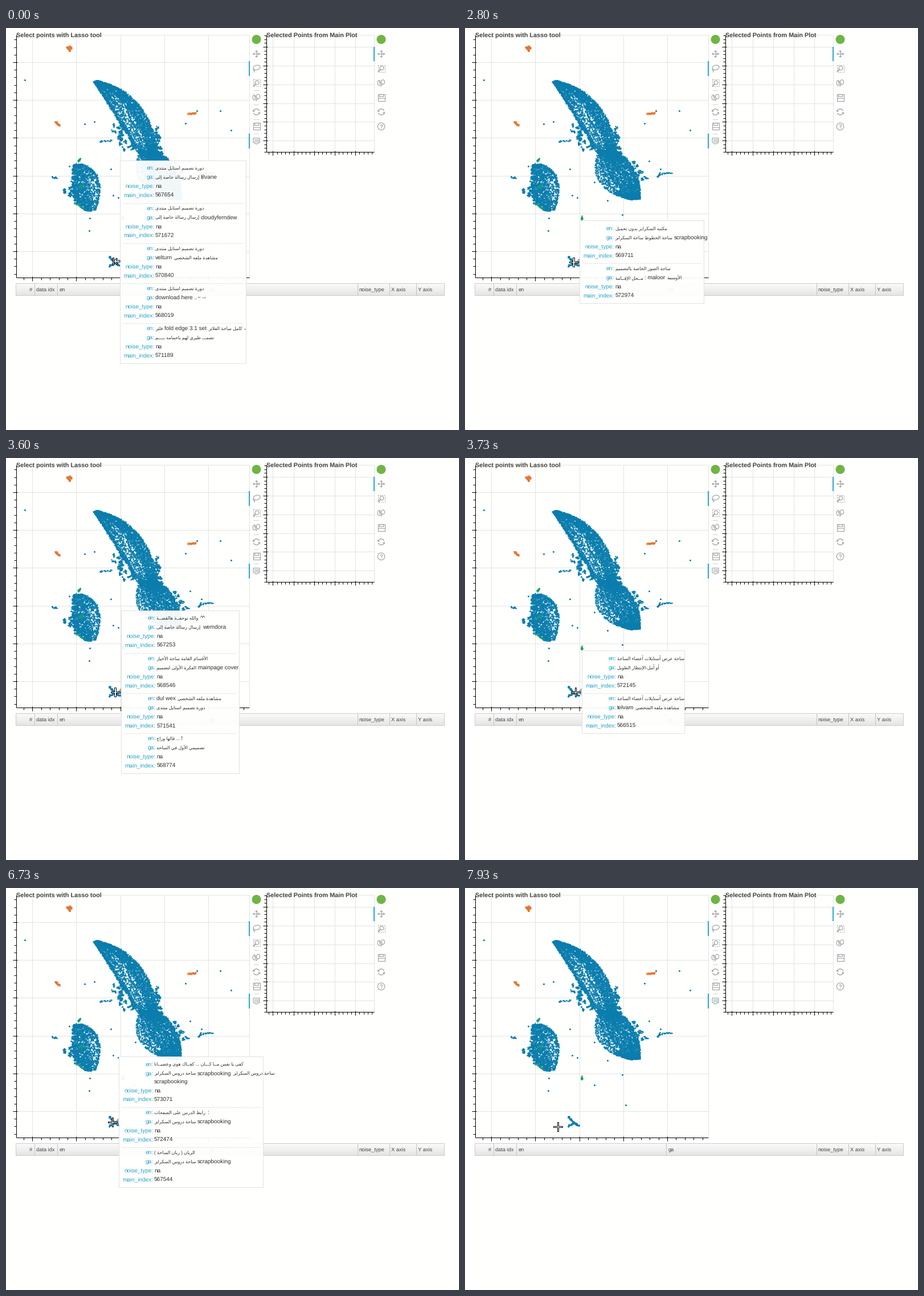
A matplotlib script for the animation above (8 s loop, 795 px wide and 704 px high).

```python
from itertools import groupby

import numpy as np
import matplotlib.pyplot as plt
from matplotlib.animation import FuncAnimation
from matplotlib.patches import Arc, Circle, Ellipse, Polygon, Rectangle

W, H, DPI = 795, 704, 64
STEP, LOOP = 40, 8000
PAGE, BLUE, ORANGE, GREEN, RED = "#fffffd", "#0a7dad", "#e6762e", "#169d6c", "#c8373a"
ICON, ACTIVE, INK = "#a1a6a9", "#26aad1", "#444444"

plt.rcParams["font.family"] = ["Liberation Sans", "DejaVu Sans"]
plt.rcParams["text.hinting"] = "no_hinting"
rng = np.random.default_rng(7)
fig = plt.figure(figsize=(W / DPI, H / DPI), dpi=DPI, facecolor=PAGE)
ax = fig.add_axes([0, 0, 1, 1])
ax.set(xlim=(0, W), ylim=(H, 0))
ax.axis("off")


def pt(px):
    return px * 72 / DPI


def line(points, color=ICON, lw=1.0, **kw):
    xs, ys = zip(*points)
    return ax.plot(xs, ys, color=color, lw=pt(lw), **kw)[0]


def label(x, y, text, size, color=INK, **kw):
    """Text whose capitals are centred near y."""
    return ax.text(x, y + size * 0.36, text, fontsize=pt(size), color=color, **kw)


# ---- Arabic shaping -------------------------------------------------------
LETTERS = "ءآأؤإئابةتثجحخدذرزسشصضطظعغفقكلمنهوىي\ufef5\ufef7\ufef9\ufefb"
TWO_FORMS = "آأؤإاةدذرزوى\ufef5\ufef7\ufef9\ufefb"
FORMS, DUAL, code = {}, {"ـ"}, 0xFE80
for ch in LETTERS:
    FORMS[ch] = code
    count = 1 if ch == "ء" else 2 if ch in TWO_FORMS else 4
    code += count
    if count == 4:
        DUAL.add(ch)
JOINS = set(FORMS) - {"ء"} | {"ـ"}
MIRROR = str.maketrans("()", ")(")


def shape(word):
    for i, alef in enumerate("آأإا"):
        word = word.replace("ل" + alef, chr(0xFEF5 + 2 * i))
    out = ""
    for prev, cur, nxt in zip(" " + word, word, word[1:] + " "):
        if cur in FORMS:
            back = prev in DUAL and cur in JOINS
            ahead = cur in DUAL and nxt in JOINS
            cur = chr(FORMS[cur] + back + 2 * ahead)
        out += cur
    return out[::-1].translate(MIRROR)


def is_rtl(word):
    return word in ("+", "...", "(", ")") or any("\u0600" <= c <= "\u06ff" for c in word)


def mixed_text(x, y, text, size, **kw):
    """Left-to-right runs; Arabic ones are reversed and set smaller."""
    parts = []
    for rtl, words in groupby(text.split(), is_rtl):
        words = list(words)
        run = " ".join(shape(w) for w in reversed(words)) if rtl else " ".join(words)
        run_size = size * 0.8 if rtl else size
        if parts:
            parts.append(ax.annotate(run, (1, y + size * 0.36), xycoords=(parts[-1], "data"),
                                     xytext=(pt(size * 0.28), 0),
                                     textcoords="offset points", fontsize=pt(run_size), **kw))
        else:
            parts.append(ax.text(x, y + size * 0.36, run, fontsize=pt(run_size), **kw))
    return parts


# ---- plot areas -----------------------------------------------------------
def plot_area(x0, y0, x1, y1, gx, dx, gy, dy):
    xs, ys = np.arange(gx, x1, dx), np.arange(gy, y1, dy)
    grid = dict(color="#e3e4e2", lw=pt(1), zorder=1)
    axis = dict(color="black", lw=pt(1), zorder=3)
    ax.vlines(np.append(xs, x1), y0, y1, **grid)
    ax.hlines(np.append(ys, y0), x0, x1, **grid)
    ax.vlines(x0, y0, y1, **axis)
    ax.hlines(y1, x0, x1, **axis)
    ax.vlines(xs, y1 - 2, y1 + 6, **axis)
    ax.hlines(ys, x0 - 6, x0 + 2, **axis)
    small_x = np.arange(gx - dx, x1, dx / 5)
    small_y = np.arange(gy - dy, y1, dy / 5)
    ax.vlines(small_x[small_x > x0], y1, y1 + 4, **axis)
    ax.hlines(small_y[small_y > y0], x0 - 4, x0, **axis)


plot_area(18, 12, 427, 437, 46.2, 77.2, 60, 66.2)
plot_area(457, 12, 646, 217, 468.3, 36.2, 33, 32.85)
label(18, 13, "Select points with Lasso tool", 10.9, weight="bold")
label(457, 13, "Selected Points from Main Plot", 10.9, weight="bold")


# ---- scattered points -----------------------------------------------------
def dots(points, color=BLUE, size=2.5):
    ax.plot(points[0], points[1], "o", ms=pt(size), mew=0, color=color, zorder=2)


def bezier(ends, t):
    a, b, c = (np.array(p)[:, None] for p in ends)
    return a * (1 - t) ** 2 + 2 * b * t * (1 - t) + c * t ** 2


def body(left, right, n, weight):
    """Points between two curves; weight(t, s) is the chance to keep each."""
    t, s = rng.random((2, n))
    p = bezier(left, t) * (1 - s) + bezier(right, t) * s + rng.normal(0, 0.4, (2, n))
    dots(p[:, rng.random(n) < weight(t, s)])


def strand(start, end, n, color=BLUE, spread=0.7):
    a, b = np.array(start)[:, None], np.array(end)[:, None]
    dots(a + (b - a) * rng.random(n) + rng.normal(0, spread, (2, n)), color)


def fringe(edge, t0, t1, near, far, clumps):
    """Short random strands beside an edge."""
    for x, y in bezier(edge, rng.uniform(t0, t1, clumps)).T:
        x += rng.uniform(near, far)
        dx, dy = rng.normal(0, 3.5, 2)
        strand((x, y), (x + dx, y + dy), 12, spread=1.1)


def streaks(t, s):
    thin = 0.15 + 0.6 * np.sin(s * 30 + 2 * t) ** 2
    return np.where((s > 0.55) | (s < 0.1), 1, thin)


WING_L, WING_R = [(154, 94), (187, 146), (236, 226)], [(160, 92), (257, 114), (268, 228)]
LOBE_L, LOBE_R = [(234, 212), (209, 284), (292, 300)], [(264, 214), (310, 240), (307, 299)]
ISLE_L, ISLE_R = [(117, 239), (109, 297), (138, 319)], [(134, 238), (182, 256), (156, 320)]

body(WING_L, WING_R, 4600, streaks)
body(LOBE_L, LOBE_R, 3300,
     lambda t, s: np.where((s > 0.32) | (t > 0.75), 1, 0.3 + 0.5 * np.cos(s * 16) ** 2))
body(ISLE_L, ISLE_R, 2100,
     lambda t, s: np.where(s < 0.6, 0.9, np.where(s > 0.9, 0.9, 0.45)))
fringe(WING_L, 0.62, 0.93, -22, 2, 22)
fringe(WING_R, 0.72, 0.98, 0, 6, 14)
fringe(LOBE_R, 0.35, 0.7, 2, 10, 7)
fringe(ISLE_L, 0.35, 0.8, -20, 0, 15)
dots(rng.uniform([[30], [80]], [[410], [380]], (2, 24)), size=3)

HUB = (191, 411)
for tip in ((181, 400), (200, 416), (181, 417)):
    strand(HUB, tip, 28)
for start, end in (((163, 199), (187, 196)), ((344, 255), (362, 253)),
                   ((338, 260), (342, 254)), ((80, 260), (88, 263))):
    strand(start, end, 16)
for start, end in (((106, 33), (115, 34)), ((108, 35), (113, 40)),
                   ((320, 149), (333, 149)), ((87, 165), (95, 171))):
    strand(start, end, 26, ORANGE, 0.9)
for start, end in (((126, 233), (131, 228)), ((118, 306), (139, 318)),
                   ((128, 278), (134, 277)), ((204, 330), (205, 335))):
    strand(start, end, 14, GREEN)
dots(np.array([(125, 289), (146, 307)]).T, RED, 1.8)


# ---- toolbars -------------------------------------------------------------
def outline_icon(patch):
    patch.set(fill=False, ec=ICON, lw=pt(1.2))
    ax.add_patch(patch)


def logo(x, y):
    ax.add_patch(Circle((x, y), 8, fc="#6fb544", ec="none"))


def pan(x, y):
    for dx, dy in ((1, 0), (-1, 0), (0, 1), (0, -1)):
        line([(x, y), (x + 5 * dx, y + 5 * dy)], lw=1.3)
        tip = np.array([x + 6.5 * dx, y + 6.5 * dy])
        base, side = tip - 2.8 * np.array([dx, dy]), 2.6 * np.array([-dy, dx])
        ax.add_patch(Polygon([tip, base + side, base - side], fc=ICON, ec="none"))


def lasso(x, y):
    outline_icon(Ellipse((x + 0.5, y - 1.5), 12.5, 8, angle=-15))
    line([(x - 4, y + 1), (x - 5.5, y + 3), (x - 3, y + 4), (x - 4, y + 6.5)], lw=1.2)


def box_zoom(x, y):
    ax.add_patch(Rectangle((x - 6, y - 6), 12, 12, fill=False, ec=ICON, lw=pt(1.1),
                           ls=(0, (1.5, 1.5))))
    outline_icon(Circle((x + 1, y - 0.5), 3.4))
    line([(x - 1.5, y + 2), (x - 5, y + 5.5)], lw=2)


def wheel_zoom(x, y):
    outline_icon(Ellipse((x + 3, y - 1.5), 6, 8))
    line([(x + 1.5, y + 2), (x - 0.5, y + 5.5)], lw=1.6)
    outline_icon(Ellipse((x - 3.8, y), 5, 9))
    line([(x - 3.8, y - 4), (x - 3.8, y - 0.5)], lw=1.1)


def reset(x, y):
    for start, sx in ((20, 1), (200, -1)):
        ax.add_patch(Arc((x, y), 10.5, 10.5, theta1=start, theta2=start + 140,
                         color=ICON, lw=pt(1.4)))
        tip = (x + 6.5 * sx, y + 0.2 * sx)
        ax.add_patch(Polygon([tip, (tip[0] - 4 * sx, tip[1] + 0.5 * sx),
                              (tip[0] - 0.3 * sx, tip[1] + 4 * sx)], fc=ICON, ec="none"))


def save(x, y):
    outline_icon(Rectangle((x - 6, y - 6), 12, 12))
    outline_icon(Rectangle((x - 3.5, y - 6), 7, 4))
    line([(x - 6, y + 1.5), (x + 6, y + 1.5)])


def hover(x, y):
    outline_icon(Polygon([(x - 5.5, y - 5), (x + 5.5, y - 5), (x + 5.5, y + 2.5),
                          (x, y + 5.5), (x - 5.5, y + 2.5)]))
    for dy in (-3, -1, 1):
        line([(x - 3.5, y + dy), (x + 3.5, y + dy)], lw=0.9)


def help_mark(x, y):
    outline_icon(Circle((x, y), 6.2))
    label(x, y, "?", 9.5, ICON, ha="center", weight="bold")


PITCH = 25.4


def toolbar(x, tools, active, dashes=()):
    for i, tool in enumerate(tools):
        y = 20 + PITCH * i
        tool(x, y)
        if i in active:
            ax.add_patch(Rectangle((x - 13.5, y - PITCH / 2), 2, PITCH, fc=ACTIVE,
                                   ec="none", zorder=4))
        if i in dashes:
            line([(x - 4.5, y + PITCH / 2), (x + 3.5, y + PITCH / 2)], "#cfd2d4")


toolbar(439.5, [logo, pan, lasso, box_zoom, wheel_zoom, reset, save, hover], (2, 7), range(3, 7))
toolbar(658.5, [logo, pan, box_zoom, wheel_zoom, save, reset, help_mark], (1,))

# ---- table header ---------------------------------------------------------
shade = np.linspace(0.985, 0.9, 21)[:, None, None] * np.ones((1, 1, 3))
ax.imshow(shade, extent=(17, 769, 468, 447), aspect="auto", zorder=1)
ax.add_patch(Rectangle((17, 447), 752, 21, fill=False, ec="#cccccc", lw=pt(1)))
label(46, 457.5, "#", 9.2, ha="right")
for x, name in ((50, "data idx"), (90, "en"), (353, "ga"), (616.5, "noise_type"),
                (672.5, "X axis"), (720, "Y axis")):
    ax.vlines(x, 447, 468, color="#c4c4c4", lw=pt(1))
    label(x + 3.3, 457.5, name, 9.2)

# ---- tooltips -------------------------------------------------------------
COURSE = "دورة تصميم استايل منتدى"
SEND = "إرسال رسالة خاصة إلى "
PROFILE = " مشاهدة ملفه الشخصي"
SCRAPS = "ساحة دروس السكرابز scrapbooking"
SHOW = "ساحة عرض أستايلات أعضاء الساحة"

FIRST = [
    (COURSE, SEND + "tilvane", 567654),
    (COURSE, SEND + "cloudyferndew", 571672),
    (COURSE, "velturn" + PROFILE, 570840),
    (COURSE, "download here ..~ --", 568019),
    ("فلتر fold edge 3.1 set كامل ساحة الفلاتر -", "تصمـــ طيري لهم ياحمامه ـــــم", 571189),
]
SCRAP = [
    ("مكتبه السكرابز بدون تحميل", "ساحة الخطوط ساحة السكرابز scrapbooking", 569711),
    ("ساحة الصور الخاصة بالتصميم", "مــحل الإقــامة : maloor الأوسمة", 572974),
]
STORY = ("والله توحفــة هالقصــة ^^", SEND + "wemdora", 567253)
COVER = ("الأقسام العامة ساحة الأخبار", "الفكرة الأولى لتصميم mainpage cover", 568546)
VIEW = ("dul wex" + PROFILE, COURSE, 571541)
SAID = ("قالها وراح .. !", "تصميمي الأول في الساحه", 568774)
FONTS = ("الملف الشخصي لـ patterndune patterndune", "طلب خطوط + شرح طريقة عمل اطار", 569301)
STYLES = [(SHOW, "أو أمل-الإنتظار الطويل", 572145), (SHOW, "telvam" + PROFILE, 566515)]
LESSONS = [
    ("كفى يا نفس مــا كـــان ... كفــاك هوى وعصيــانا",
     SCRAPS + " ساحة دروس السكرابز\nscrapbooking", 573071),
    ("رابط الدرس على الصفحات :", SCRAPS, 572474),
    ("الربان ( ربان الساحة )", SCRAPS, 567544),
]
MID_Y, ENTRY_H, ROW_H = 409.5, 70.2, 16


def tooltip(left, width, entries):
    extra = 14 * sum("\n" in e[1] for e in entries)
    height = ENTRY_H * len(entries) + 4 + extra
    top = MID_Y - height / 2
    parts = [ax.add_patch(Rectangle((left, top), width, height, fc=PAGE, ec="#dfe1e0",
                                    lw=pt(1), alpha=0.95, zorder=5))]
    y = top + 12.7
    for i, (en, ga, index) in enumerate(entries):
        if i:
            parts.append(line([(left + 5, y - 8.2), (left + width - 5, y - 8.2)], "#d9dbda",
                              0.9, ls=(0, (2.5, 1.5)), zorder=6))
        rows = (("en:", en), ("ga:", ga), ("noise_type:", "na"), ("main_index:", str(index)))
        for name, value in rows:
            parts.append(label(left + 60.7, y, name, 10, "#26a3c8", ha="right", zorder=6))
            for k, text in enumerate(value.split("\n")):
                y += 14 * (k > 0)
                parts += mixed_text(left + 62.5, y, text, 10, color="#2f2f2f", zorder=6)
            y += ROW_H
        y += ENTRY_H - 4 * ROW_H
    for p in parts:
        p.set_visible(False)
    return left, parts


TIPS = {
    "first": tooltip(199.5, 221, FIRST),
    "scrap": tooltip(201, 218, SCRAP),
    "long": tooltip(202, 234, STYLES + [STORY, COVER, VIEW, SAID] + SCRAP + FIRST[3:]),
    "story": tooltip(202, 206.5, [STORY, COVER, VIEW, SAID]),
    "fonts": tooltip(202, 238, [VIEW, FONTS, STORY]),
    "styles": tooltip(204.5, 180.5, STYLES),
    "lessons": tooltip(197.5, 253.5, LESSONS),
}
SHOWN = [(0, "first"), (2800, "scrap"), (2870, "long"), (3600, "story"), (3670, "fonts"),
         (3730, "styles"), (6470, "fonts"), (6600, "story"), (6730, "lessons"), (6800, None)]

# ---- pointers -------------------------------------------------------------
a, b = 1.4, 8
CROSS = np.array([(-a, -b), (a, -b), (a, -a), (b, -a), (b, a), (a, a),
                  (a, b), (-a, b), (-a, a), (-b, a), (-b, -a), (-a, -a)])
outline = dict(fc="white", ec="black", lw=pt(1), zorder=8)
cross = ax.add_patch(Polygon(CROSS, **outline))
wedge = ax.add_patch(Polygon([(0, 0), (1, 1), (1, 0)], fc="#909599", ec="none",
                             alpha=0.85, zorder=7))
edge_pointer = [
    ax.add_patch(Rectangle((186.5, 402), 2, 13, **outline)),
    ax.add_patch(Polygon([(189, 408.5), (194, 403), (195.5, 404.5), (193, 407), (200, 407),
                          (200, 410), (193, 410), (195.5, 412.5), (194, 414)], **outline)),
]
AWAY, REST, END = np.array([(184, 401.5), (182.5, 389.5), (163, 418)])
MOVES = (7400, 7530, 7600, 7670, 7800, 7930)


def pointer(now, tip):
    """Rides left of the tooltip, then leaves and eases to its end."""
    if tip:
        return np.array([tip[0] - 10.5, MID_Y + 0.5])
    if now < 7000:
        return AWAY
    u = sum(now >= m for m in MOVES) / len(MOVES)
    return REST + (END - REST) * u * u * (3 - 2 * u)


def draw(i):
    now = i * STEP + 30
    tip = TIPS.get([name for start, name in SHOWN if start <= now][-1])
    for other in TIPS.values():
        for p in other[1]:
            p.set_visible(other is tip)
    resizing = now < 70
    for p in edge_pointer:
        p.set_visible(resizing)
    cross.set_visible(not resizing)
    cross.set_xy(CROSS + pointer(now, tip))
    wedge.set_visible(not resizing and tip is not None)
    if tip:
        x = tip[0]
        wedge.set_xy([(x - 6.5, MID_Y), (x, MID_Y - 6.5), (x, MID_Y + 6.5)])
    return []


anim = FuncAnimation(fig, draw, frames=LOOP // STEP, interval=STEP, repeat=True,
                     repeat_delay=0, blit=False)
plt.show()
```
